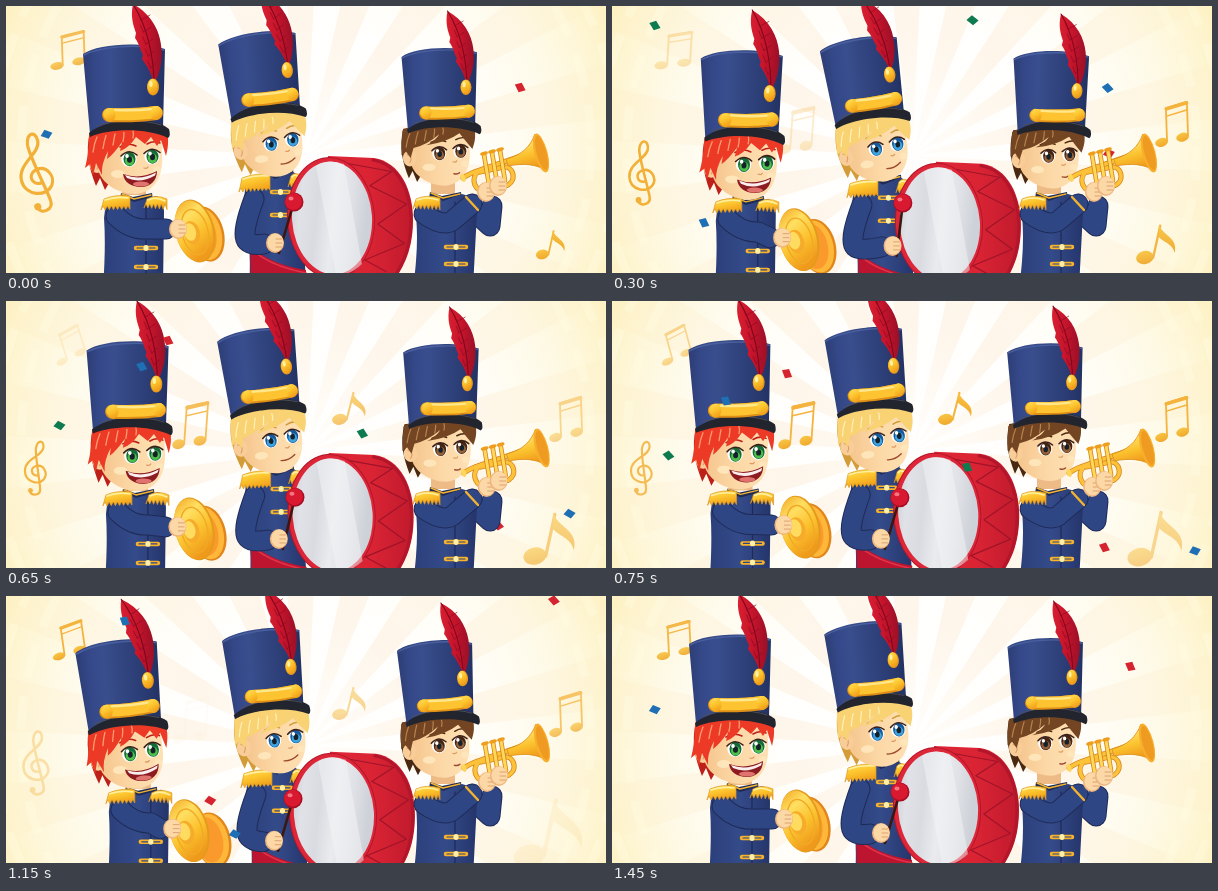
These frames come from a looping animation (600x267 px, 1500 ms). An HTML page:

```html
<!DOCTYPE html>
<html lang="en">
<head>
<meta charset="utf-8">
<title>Marching band</title>
<style>
html, body { margin: 0; width: 100%; height: 100%; overflow: hidden; background: #fffdf2; }
svg { display: block; width: 600px; height: 267px; }
</style>
</head>
<body>
<svg id="stage" viewBox="0 0 600 267" xmlns="http://www.w3.org/2000/svg"></svg>
<script>
const LOOP = 1500, STEP = 50, SWING = LOOP - STEP;
const INK = '#1e2b57', NAVY = '#2f4685', SKIN = '#fcd8a6', GOLD = 'url(#gold)';
const stage = document.getElementById('stage');

const path = (d, fill, more = '') => `<path d="${d}" fill="${fill}" ${more}/>`;
const line = (d, color, w, more = '') =>
  `<path d="${d}" fill="none" stroke="${color}" stroke-width="${w}" stroke-linecap="round" stroke-linejoin="round" ${more}/>`;
const oval = (x, y, rx, ry, fill, turn = 0, more = '') =>
  `<ellipse cx="${x}" cy="${y}" rx="${rx}" ry="${ry}" fill="${fill}" transform="rotate(${turn} ${x} ${y})" ${more}/>`;
const group = (id, body, more = '') => `<g id="${id}" ${more}>${body}</g>`;
const range = n => [...Array(n).keys()];
const ramp = (id, colors, dir = 'x2="1" y2="0"') => `<linearGradient id="${id}" ${dir}>` +
  colors.map((c, i) => `<stop offset="${i / (colors.length - 1)}" stop-color="${c}"/>`).join('') + '</linearGradient>';

const defs = '<defs>' +
  ramp('gold', ['#ffe05e', '#fdc62f', '#f2a11b'], 'x2="0.4" y2="1"') +
  ramp('note', ['#f9c544', '#f0a92d'], 'x2="0" y2="1"') +
  ramp('crown', ['#2d3e76', '#35498a', '#394e8d', '#334783', '#2f417b', '#293a70', '#233263']) +
  ramp('coat', ['#2b3f7a', '#344b8a', '#25356b']) +
  ramp('skin', ['#f5c48c', '#fcd8a6', '#fee0b4']) +
  ramp('plume', ['#d91f30', '#c5142c', '#9a1027']) +
  ramp('shell', ['#dd2535', '#da2434', '#c01a2d']) +
  ramp('hide', ['#c6c9d0', '#e0e2e7', '#d9dbe1', '#e9ebee', '#dfe1e6', '#ced1d8'], 'x2="1" y2="0.25"') +
  ramp('brass', ['#f2a31e', '#ffdf62', '#fbc12d', '#f09a1c'], 'x2="0.3" y2="1"') +
  `<radialGradient id="glow" gradientUnits="userSpaceOnUse" cx="300" cy="140" r="340">
<stop offset="0" stop-color="#fff" stop-opacity=".9"/><stop offset=".35" stop-color="#fffdf6" stop-opacity=".2"/>
<stop offset=".7" stop-color="#fef8de" stop-opacity=".6"/><stop offset="1" stop-color="#fdf0bd"/>
</radialGradient></defs>`;

function backdrop() {
  const at = a => `${300 + 420 * Math.cos(a)},${150 + 420 * Math.sin(a)}`;
  const rays = range(18).map(i => i * Math.PI / 9 + .05).map(a => `M300,150 L${at(a)} L${at(a + .175)} Z`).join(' ');
  const ring = r => `<circle cx="300" cy="140" r="${r}" fill="none" stroke="#fffbe4" stroke-width="9" stroke-dasharray="34 19" opacity=".3"/>`;
  return `<rect width="600" height="267" fill="#fff"/>${path(rays, '#fef4e8')}` +
    `<rect width="600" height="267" fill="url(#glow)"/>${ring(285)}${ring(312)}`;
}

// Hat and face share one frame whose zero is the middle of the hat's brim.
function hat() {
  const barbs = range(5).map(i => `M${14 + i * 2.4},${i * 12 - 108} l${9 - i},-5 m${i - 9},5 l-3,-7`).join(' ');
  return path('M-44,-74 C-30,-84 12,-87 38,-79 L36,-1 C18,-10 -18,-5 -37,6 Z', 'url(#crown)') +
    line('M-43,-73 C-28,-81 10,-85 37,-78', '#4a5f9e', 1.5) +
    path('M-38,5 C-22,-9 24,-14 42,1 Q44,8 41,10 C20,0 -16,0 -37,9 Z', '#22242e') +
    line('M-30,-2 C-10,-9 16,-9 34,-3', '#4b4e5c', 1) +
    line('M-18,-13 Q8,-12 29,-15', '#df8f16', 14) + line('M-18,-14 Q8,-13 29,-16', '#fdc331', 12) +
    line('M-12,-18 Q8,-17 26,-19', '#ffe88c', 2.5) +
    oval(-17, -13, 5.5, 7, GOLD) + oval(29, -15, 5.5, 7, GOLD) +
    path('M27,-44 C38,-62 42,-104 6,-124 C3,-110 7,-101 9,-95 L8,-90 C13,-83 13,-78 16,-73 L15,-69 C21,-61 24,-55 27,-44 Z', 'url(#plume)') +
    line('M27,-43 C27,-72 20,-102 6,-124', '#7c081b', 1.1) + line(barbs, '#8d0a20', .7) +
    oval(26, -41, 6, 8.5, '#e8991b') + oval(25.6, -41.5, 5, 7.5, GOLD) + oval(24, -44, 1.6, 3, '#fff1a8');
}

function eye(x, y, iris, dark) {
  return oval(x, y, 7.6, 7.8, '#fff') + oval(x + .5, y, 6, 7.2, dark) +
    oval(x + .5, y + 1.8, 4.6, 4.8, iris) + oval(x + .5, y + .5, 2.5, 3.2, '#15202b') +
    oval(x - 2, y - 3, 1.8, 2, '#fff') +
    line(`M${x - 8},${y - 3} Q${x},${y - 11} ${x + 8},${y - 4}`, '#3b2018', 1.6);
}

const mouths = {
  grin: path('M-4,46 Q13,52 30,43 C30,53 23,59 14,59 C4,59 -3,54 -4,46 Z', '#8c1c22') +
    path('M-2,47 Q13,53 29,44.500 L28,47.500 Q13,56 0,50 Z', '#fbeeee') + oval(14, 56, 8, 2.5, '#e0736d'),
  smile: line('M11,53 Q19,54 26,48', '#9c4a2c', 1.4),
  blow: line('M18,53 q4,1 6,-1', '#9c4a2c', 1.6)
};
const spiky = 'M-38,6 C-18,-6 22,-9 40,3 C42,13 41,20 39,28 L34,12 L30,18 L24,9 L18,16 L9,9 Q2,20 -7,23 L-5,14 Q-14,27 -20,31 L-19,23 Q-26,36 -25,47 L-31,35 L-34,48 L-37,36 L-42,40 Q-38,25 -38,6 Z';
const swept = 'M-38,6 C-18,-6 22,-9 40,3 C42,12 41,18 38,26 Q31,18 24,9 Q10,19 -12,22 Q-2,17 2,10 Q-12,22 -26,25 L-29,36 L-34,29 L-39,33 Q-39,20 -38,6 Z';

function head(b) {
  const shine = range(5).map(i => `M${i * 9 - 30},${9 - i * 1.5} q${-3 + i},${7 - i} ${-4 + i},${15 - i * 2}`).join(' ');
  return group('', path('M-37,4 C-42,24 -38,40 -31,58 L-27,50 L-22,62 L-14,48 L-6,0 Z', b.shade) +
    path('M-29,6 L-30,34 C-30,54 -10,66 9,66 C28,64 37,48 35,24 L34,3 Z', 'url(#skin)') +
    oval(-30, 36, 7.5, 9, '#f8cd98') + line('M-33,32 q7,2 3,9', '#dd9e69', 1.2) +
    oval(-9, 46, 7, 4, '#fee6ba') + oval(30, 42, 4, 3.5, '#fee6ba') +
    eye(2, 31, b.iris, b.dark) + eye(25, 28.5, b.iris, b.dark) +
    line('M-7,19 Q1,14 9,18 M20,16 Q27,12 33,15', b.shade, 1.6) +
    line('M17,40 q3,1 4,-1', '#dc9b64', 1.3) + mouths[b.mouth] +
    path(b.mouth === 'grin' ? spiky : swept, b.hair) + line(shine, b.light, 1.3), `transform="translate(${b.shift})"`) + hat();
}

function fringe(x, y, w, h, tilt = 0) {
  const n = Math.round(w / 4), s = w / n;
  const teeth = range(n).reverse().map(i =>
    `L${x + (i + 1) * s},${y + h + tilt * i / n} L${x + (i + .5) * s},${y + h - 4}`).join(' ');
  return path(`M${x},${y + h} L${x + 3},${y + 2} Q${x + w / 2},${y - 3} ${x + w},${y + tilt} ${teeth} Z`, GOLD, 'stroke="#dd9820" stroke-width=".7"') +
    line(`M${x + 4},${y + 3} Q${x + w / 2},${y - 1} ${x + w - 2},${y + 2 + tilt}`, '#fff0a0', 1.6);
}
const toggle = (x, y, w) => line(`M${x},${y} h${w}`, '#f6b32b', 4.5) + line(`M${x + 1},${y} h${w - 2}`, NAVY, 1.2) +
  oval(x + w / 2, y, 2.6, 2.9, '#fff0a6');
const collar = (x, y) => path(`M${x - 11},${y - 24} h24 v22 h-24 Z`, '#eebb87') +
  path(`M${x - 12},${y - 4} L${x},${y} L${x + 19},${y - 4} L${x + 20},${y + 4} L${x + 1},${y + 7} L${x - 13},${y + 3} Z`, INK) +
  line(`M${x - 11},${y - 3} L${x + 1},${y + 2} L${x + 18},${y - 2}`, '#f3b32f', 1.4);
const fist = (x, y) => oval(x, y, 9, 10, '#eeb57e') + oval(x + .5, y - .5, 8, 9, SKIN) +
  line(`M${x + 1},${y - 4} h6 m-6,4 h6 m-6,4 h6`, '#dda36f', 1);
const arm = (d, id = '') => line(d, INK, 21, `class="${id}"`) + line(d, NAVY, 19, `class="${id}"`);

const boys = [
  { at: '121,122', size: 1, lean: 0, shift: '0,0', mouth: 'grin', hair: '#ec3a26', shade: '#bd2018', light: '#ff9a6e', iris: '#4fbf4c', dark: '#146b37',
    pivot: [125, 180], right: [8, 6, 2.1], left: [3, 5, -5.6] },
  { at: '260,105', size: .95, lean: -5, shift: '0,4', mouth: 'smile', hair: '#f8d273', shade: '#d39c38', light: '#fff0b3', iris: '#3fa4dd', dark: '#155a9c',
    pivot: [270, 165], right: [0, 5, -2.4], left: [3, 7, .5] },
  { at: '436,119', size: .92, lean: 0, shift: '-5,0', mouth: 'blow', hair: '#744522', shade: '#492811', light: '#b7834d', iris: '#94623a', dark: '#452411',
    pivot: [440, 180], right: [2, 3, 2.2], left: [1, 2, -3] }
];
const headOf = i => group('head' + i,
  `<g transform="translate(${boys[i].at}) rotate(${boys[i].lean}) scale(${boys[i].size})">${head(boys[i])}</g>`);

function cymbalBoy() {
  const far = oval(200, 228, 18, 28, '#e0861a', -14) + oval(199, 228, 16.5, 26.5, '#ffb739', -14) + oval(196, 228, 14, 23, '#fb9a2c', -14);
  const near = oval(189, 225, 19.5, 32, '#e39a1d', -14) + oval(188, 225, 18.5, 31, 'url(#brass)', -14) +
    oval(189, 226, 13, 23, 'none', -14, 'stroke="#f0aa25" stroke-width="1.4"') + oval(186, 227, 8, 12, '#f6ac2a', -14) + oval(184, 226, 6, 9, '#ffdb60', -14);
  return group('body0',
    collar(127, 191) + path('M100,196 Q118,190 128,196 L150,190 Q158,192 158,206 L157,282 L97,282 Q100,240 98,212 Z', 'url(#coat)') +
    line('M140,196 V282', INK, 1.2) + toggle(130, 242, 20) + toggle(130, 261, 20) +
    fringe(138, 191, 23, 11, 2) + arm('', 'hold') + fringe(95, 191, 29, 13, -1)) +
    group('cymbals', group('far', far) + near + fist(172, 223)) + headOf(0);
}

function drum() {
  const lace = 'M' + range(8).map(i => {
    const a = (i * 20 - 75) * Math.PI / 180, back = i % 2;
    return `${(back ? 364 : 327) + (back ? 38 : 45) * Math.cos(a)},${213 + 58 * Math.sin(a)}`;
  }).join(' L');
  return path('M322,150 L368,152 C394,156 407,184 407,214 C407,246 396,264 384,280 L320,280 Z', 'url(#shell)') +
    line(lace, '#a01329', 1.2) + line('M367,154 C392,158 405,185 405,214 C405,246 394,264 382,280', '#b3152b', 3) +
    oval(325, 212, 44, 61, '#b3152b', -4) + oval(325, 212, 43, 60, '#dd2638', -4) +
    oval(326, 212, 40, 56.5, 'url(#hide)', -4) +
    path('M310,160 Q322,152 338,158 L356,258 Q344,270 330,268 Z', '#f5f6f8', 'opacity=".5"');
}

function drumBoy() {
  return group('body1',
    collar(268, 167) + path('M240,172 Q258,165 269,173 L287,166 Q296,170 296,188 L300,282 L243,282 Q246,240 238,195 Z', 'url(#coat)') +
    toggle(266, 186, 17) + toggle(266, 209, 17) +
    path('M244,239 Q262,258 300,264 L300,282 L245,282 Z', '#bd1530') + line('M245,243 Q264,260 300,267', '#e23449', 1.5) +
    fringe(282, 168, 14, 13, 2) + drum() + arm('', 'beat') + fringe(233, 170, 31, 16, -2) +
    line('', '#3a1712', 2.6, 'class="stick"') + group('ball', oval(0, 0, 9.5, 9.5, '#a80d25') + oval(-.5, -.5, 8.5, 8.5, '#d8192f') + oval(-3, -3.5, 2.5, 2, '#f37781')) +
    group('grip', fist(269, 237))) + headOf(1);
}

function trumpet() {
  const tubes = 'M457,172 Q464,167 474,164 L512,151 M474,164 C462,172 470,189 482,185 L502,179 C511,174 507,160 498,161 L474,166';
  const valve = x => line(`M${x},${268 - x / 4} l5,30`, '#d6851a', 4.6) + line(`M${x},${268 - x / 4} l5,30`, '#ffd75a', 3) +
    oval(x, 267 - x / 4, 4, 1.8, '#ee9d1d', -15);
  return line(tubes, '#d6851a', 5.2) + line(tubes, '#fcc23a', 3.6) + [478, 486, 494].map(valve).join('') +
    path('M500,153 C516,149 524,141 529,128 Q540,138 541,165 C530,158 518,157 502,160 Z', 'url(#brass)', 'stroke="#dd8d19" stroke-width=".8"') +
    oval(535, 147, 6.5, 20, '#f7ae2c', -15) + oval(535.5, 147, 4.8, 17.5, '#ef9a20', -15) + oval(457, 172, 2.4, 4, '#ffd65c', -20);
}

function trumpetBoy() {
  return arm('M470,207 L484,220 L486,200') + collar(436, 190) +
    path('M411,194 Q428,188 437,195 L456,188 Q470,191 471,206 L467,282 L407,282 Q413,240 410,210 Z', 'url(#coat)') +
    line('M449,196 V282', INK, 1.2) + toggle(440, 241, 20) + toggle(440, 258, 20) +
    arm('M418,208 Q436,221 446,215 L466,198') + line('M460,191 L472,204', '#f3b32f', 2.4) + fringe(407, 191, 27, 12, 1) +
    headOf(2) + group('horn', trumpet() + fist(480, 186) + fist(492, 180));
}

const shapes = {
  pair: oval(-11, 20, 6.5, 4.8, 'url(#note)', -20) + oval(10, 15, 6.5, 4.8, 'url(#note)', -20) +
    line('M-5.500,19 V-18 L15.500,-24 V14', '#f4b33c', 1.8) + line('M-5,-17 L15,-23', '#f4b33c', 4) + line('M-5,-9 L15,-15', '#f4b33c', 1.6),
  single: oval(-8, 10, 6.5, 4.8, 'url(#note)', -22) + line('M-2,9 L-1,-15', '#f4b33c', 1.8) +
    path('M-2,-16 C1,-8 14,-9 13,3 C10,-4 4,-3 -1,-7 Z', 'url(#note)'),
  clef: line('M2,11 C-7,11 -9,0 0,-3 C12,-6 18,8 12,16 C4,26 -16,20 -16,4 C-16,-14 10,-18 10,-31 C10,-42 1,-41 -1,-29 C-2,-18 6,18 7,30 C8,40 -5,42 -8,34', '#f3b039', 3.2) + oval(-7, 33, 3.6, 3.6, '#f3b039')
};

// A note appears at `born`, fades in and out within `life`, and may come again `every` so often.
const notes = [
  { shape: 'pair', x: 62, y: 44, born: 600, life: 1400, fadeIn: 300, fadeOut: 600, size: .7, wide: 1.35, grow: .12, turn: -18, spin: 25 },
  { shape: 'clef', x: 30, y: 167, born: 0, life: 1450, fadeOut: 850, swell: -.32, turn: -15, swing: 17 },
  { shape: 'pair', x: 185, y: 124, born: 150, life: 1010, fadeIn: 600, fadeOut: 400, turn: 4 },
  { shape: 'single', x: 345, y: 109, born: 420, life: 930, fadeIn: 330, fadeOut: 400, size: 1.15, turn: 12 },
  { shape: 'pair', x: 560, y: 118, born: 110, life: 390, every: 465, fadeIn: 150, fadeOut: 150, size: .9, wide: 1.12, turn: -2 },
  { shape: 'single', x: 546, y: 240, born: 0, life: 1250, fadeOut: 1000, grow: 1.5, turn: 10 }
];

// Confetti falls at a steady speed (px per s); drift and sway follow the height.
const BLUE = '#1f6fb4', RED = '#d5232f', GREEN = '#0d7a50';
const bits = [
  { color: RED, start: 1130, speed: 220, x: 550, drift: -.23, sway: -20 },
  { color: BLUE, start: 1065, speed: 295, x: 152, drift: -.09, sway: -100 },
  { color: GREEN, start: 235, speed: 300, x: 41, drift: .1, sway: 0 },
  { color: GREEN, start: 258, speed: 338, x: 361, drift: -.035, sway: 0 },
  { color: BLUE, start: 80, speed: 373, x: 453, drift: .52, sway: 0 },
  { color: BLUE, start: 460, speed: 345, x: 216, drift: .13, sway: -121 },
  { color: RED, start: 530, speed: 330, x: 145, drift: .25, sway: 15 }
];
const flakes = bits.map((b, i) => path('M-6,-1 L0,-5 L6,1 L0,5 Z', b.color, `id="bit${i}"`));

stage.innerHTML = defs + backdrop() + notes.map((n, i) => group('note' + i, shapes[n.shape])).join('') +
  flakes[0] + cymbalBoy() + drumBoy() + trumpetBoy() + flakes.slice(1).join('');

const set = (id, name, value) => document.getElementById(id).setAttribute(name, value);
const move = (id, x, y, more = '') => set(id, 'transform', `translate(${x} ${y}) ${more}`);
const bend = (name, d) => document.querySelectorAll('.' + name).forEach(p => p.setAttribute('d', d));
const clamp = v => Math.max(0, Math.min(1, v));

function drawBand(t) {
  const s = Math.sin(2 * Math.PI * t / SWING), rock = Math.abs(Math.asin(s)) * 2 / Math.PI;
  // Each part leans from rest to its right pose, back, then to its left pose.
  const pose = (right, left) => right.map((r, i) => (s > 0 ? r : left[i]) * Math.abs(s));

  boys.forEach((b, i) => {
    const [x, y] = pose(b.right, b.left);
    move('head' + i, x, y, `rotate(${(s > 0 ? b.right : b.left)[2] * rock} ${b.pivot})`);
  });

  const [bx, by] = pose([6, 3], [5, 4]);
  const [cx, cy, gap] = pose([-2, 9, 8], [-6, 10, 13]);
  move('body0', bx, by);
  move('cymbals', cx, cy);
  move('far', gap, gap * .5);
  bend('hold', `M110,210 Q124,224 140,223 L${160 + cx - bx},${223 + cy - by}`);

  const [hx, hy] = pose([10, -3], [-3, 2]);
  const [sx, sy] = pose([1, -5], [-3, 1]);
  move('body1', ...pose([2, 6], [2, 6]));
  bend('beat', `M248,193 C241,212 236,230 241,235 Q246,240 ${258 + hx},${238 + hy}`);
  move('grip', hx, hy);
  move('ball', 288 + sx, 196 + sy);
  bend('stick', `M${288 + sx},${196 + sy} L${273 + hx},${247 + hy}`);
  move('horn', ...pose([2, 0], [1, 0]));
}

function drawNote(n, i, t) {
  const { life, every = LOOP, fadeIn = 1, fadeOut, size = 1, wide = 1, grow = 0, swell = 0, turn, spin = 0, swing = 0 } = n;
  const age = (t - n.born + LOOP) % LOOP % every, u = age / life, arc = Math.sin(Math.PI * u);
  const k = size + grow * u + swell * arc;
  const fade = n.born ? clamp(age / fadeIn) : 1;
  set('note' + i, 'opacity', fade * clamp((life - age) / fadeOut));
  move('note' + i, n.x, n.y, `rotate(${turn + spin * u + swing * arc}) scale(${k * wide} ${k})`);
}

function drawBit(b, i, t) {
  const y = (t - b.start + LOOP) % LOOP * b.speed / 1000;
  move('bit' + i, b.x + b.drift * y + b.sway * Math.sin(Math.PI * y / 250), y, `rotate(${25 * Math.sin(y / 35 + i)})`);
}

function tick() {
  const t = Math.floor(performance.now() % LOOP / STEP) * STEP;
  drawBand(t);
  notes.forEach((n, i) => drawNote(n, i, t));
  bits.forEach((b, i) => drawBit(b, i, t));
  requestAnimationFrame(tick);
}
tick();
</script>
</body>
</html>
```
